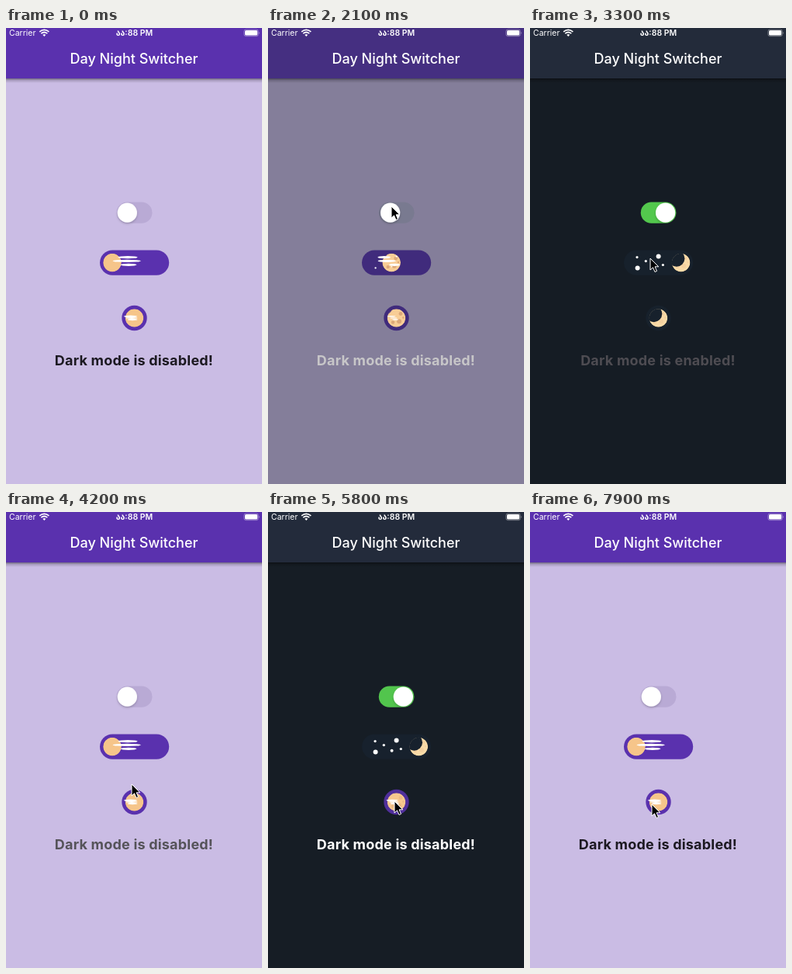
An HTML page for the animation above (8000 ms loop, 330 by 588 pixels).

```html
<!DOCTYPE html>
<html lang="en">
<head>
<meta charset="utf-8">
<title>Day Night Switcher</title>
<style>
  html, body { margin: 0; width: 100%; height: 100%; overflow: hidden; }
  svg { display: block; width: 100vw; height: 100vh; }
  text { font-family: Inter, "DejaVu Sans", sans-serif; }
</style>
</head>
<body>
<svg viewBox="0 0 330 588" preserveAspectRatio="none">
  <defs>
    <linearGradient id="fade" x2="0" y2="1">
      <stop offset="0" stop-opacity=".45"/>
      <stop offset=".4" stop-opacity=".17"/>
      <stop offset="1" stop-opacity="0"/>
    </linearGradient>
    <filter id="soft" x="-30%" y="-30%" width="160%" height="170%">
      <feDropShadow dx="0" dy="1.5" stdDeviation="1.5" flood-opacity=".22"/>
    </filter>
    <clipPath id="disc"><circle r="11.8"/></clipPath>
  </defs>

  <rect id="page" width="330" height="588"/>
  <rect y="65" width="330" height="6" fill="url(#fade)"/>
  <rect id="bar" width="330" height="65"/>

  <g fill="#fff">
    <text x="4" y="10" font-size="10.5">Carrier</text>
    <text x="165.5" y="10" font-size="10.5" font-weight="600" text-anchor="middle">აა:88 PM</text>
    <path d="M47.3 8.8 L49.3 11 L51.3 8.8 Q49.3 7.2 47.3 8.8Z"/>
    <g fill="none" stroke="#fff" stroke-width="1.7">
      <path d="M45.3 7.1 Q49.3 3.9 53.3 7.1"/>
      <path d="M43.2 4.8 Q49.3 -.2 55.4 4.8"/>
    </g>
    <rect x="306.9" y="2" width="18.4" height="8.6" rx="2.4" fill="none" stroke="#fff" stroke-opacity=".45" stroke-width=".8"/>
    <rect x="308" y="3" width="16.2" height="6.6" rx="1.5"/>
    <path d="M326.2 4.9 q1.4 1.4 0 2.8z" opacity=".55"/>
    <text id="title" x="165" y="46" font-size="18" font-weight="500" text-anchor="middle">Day Night Switcher</text>
  </g>

  <rect x="142.8" y="224.6" width="45.6" height="27.2" rx="13.6" fill="#503c78" fill-opacity=".14"/>
  <rect id="green" x="142.8" y="224.6" width="45.6" height="27.2" rx="13.6" fill="#53c84d"/>
  <circle id="knob" cy="238.2" r="12.6" fill="#fff" filter="url(#soft)"/>

  <rect id="pill" x="121" y="286.5" width="89.2" height="32.2" rx="16.1"/>
  <g id="pillOrb"></g>
  <g id="pillStars" fill="#fff"></g>

  <circle id="ring" cx="165.5" cy="374" r="16.2"/>
  <g id="iconOrb"></g>
  <g id="iconStars" fill="#fff"></g>

  <text id="label" x="165" y="435.3" font-size="18" font-weight="700" letter-spacing=".2" text-anchor="middle"></text>
  <path id="cursor" d="M0 0V15L3.5 11.8L6 17.5L8.5 16.4L6.1 10.8H10.8Z" fill="#000" stroke="#fff" stroke-width="1" stroke-linejoin="round"/>
</svg>
<script>
const LOOP = 8000, THEME_MS = 200;
const el = id => document.getElementById(id);
const clamp = x => Math.min(1, Math.max(0, x));
const mix = (a, b, p) => a + (b - a) * p;
const mixColor = (a, b, p) => `rgb(${a.map((v, i) => Math.round(mix(v, b[i], p)))})`;
const set = (node, attrs) => { for (const k in attrs) node.setAttribute(k, attrs[k]); };

// Theme changes; a tapped widget finishes its own animation before the theme starts.
const flips = [
  { at: 1226, dark: 1 },
  { at: 1978, dark: 0 },
  { at: 3080, dark: 1, tapped: 'pill' },
  { at: 3885, dark: 0, tapped: 'pill' },
  { at: 4980, dark: 1, tapped: 'icon' },
  { at: 5800, dark: 0, tapped: 'icon' }
];
const LEAD = 170;

// Darkness from 0 to 1, each flip easing from where the last one stopped.
const darkness = (t, ease, widget) => flips.reduce((p, f) => {
  const start = widget && f.tapped === widget ? f.at - LEAD : f.at;
  return t < start ? p : mix(p, f.dark, clamp(ease(t - start, f.dark)));
}, 0);

const linear = ms => clamp(ms / THEME_MS);
const knobEase = ms => 1 - (1 - clamp(ms / 190)) ** 2.5;
// The label drifts slowly while the theme moves, then catches up.
const labelEase = (ms, dark) => {
  const slow = dark ? .13 : .4;
  return ms < THEME_MS ? slow * ms / THEME_MS : mix(slow, 1, clamp((ms - THEME_MS) / 200));
};

const COLORS = {
  page: [[202, 188, 228], [21, 28, 36]],
  bar: [[90, 49, 174], [35, 43, 58]],
  widget: [[90, 49, 174], [23, 33, 44]],
  orb: [[246, 197, 138], [250, 219, 168]],
  label: [[28, 25, 33], [255, 255, 255]]
};
const tone = (name, p) => mixColor(...COLORS[name], p);

function makeOrb(id) {
  const g = el(id);
  g.innerHTML = `<g clip-path="url(#disc)"><circle r="11.8"/>
    <g fill="#d39c70"><circle cx="3.6" cy="4.2" r="3"/><circle cx="-4.5" cy="5.5" r="2.2"/>
    <circle cx="5.5" cy="-5.5" r="2.4"/><circle cx="8.8" cy="-.5" r="1.2"/></g><circle r="10.6"/></g>`;
  const [disc, craters, shade] = g.firstChild.children;
  return (x, y, p) => {
    set(g, { transform: `translate(${x} ${y})` });
    set(disc, { fill: tone('orb', p) });
    set(craters, { opacity: p < .4 ? p * 2 : mix(.8, .15, clamp((p - .7) / .3)) });
    set(shade, { cx: mix(-22, -5.8, p), cy: mix(-20, -5.4, p), fill: tone('widget', p) });
  };
}

function makeStars(id, specs) {
  const g = el(id);
  g.innerHTML = '<ellipse/>'.repeat(specs.length);
  return p => specs.forEach(([a, b], i) => {
    const [cx, cy, rx, ry] = a.map((v, k) => mix(v, b[k], p));
    set(g.children[i], { cx, cy, rx, ry });
  });
}

const star = (x, y, r) => [[x, y, 0, 0], [x, y, r, r]];
const drawPillOrb = makeOrb('pillOrb');
const drawIconOrb = makeOrb('iconOrb');
const drawStreaks = makeStars('pillStars', [
  [[157, 295.7, 12.5, 1.6], [138, 295.6, 1.6, 1.6]],
  [[155.7, 300.4, 18, 1.6], [149.3, 300.6, 1.6, 1.6]],
  [[158, 305.3, 10.5, 1.6], [171.4, 305.5, 1.6, 1.6]],
  star(165.6, 294.6, 3), star(138.6, 309.4, 3), star(159.6, 307.8, 2)
]);
const drawIconStreaks = makeStars('iconStars', [
  [[160.5, 371.8, 8.8, 1.2], [157, 371.8, 0, 0]],
  [[162, 373.9, 7.5, 1], [162, 374, 0, 0]],
  [[163, 376, 6.5, 1.2], [166, 376, 0, 0]]
]);

const stops = [
  [250, 340, 330], [1000, 159, 229], [2250, 159, 230], [2800, 155, 297],
  [3750, 155, 297], [4200, 162, 351], [4600, 163, 373], [6300, 163, 373],
  [6950, 175, 445], [7450, 170, 420], [7850, 157, 377], [8000, 157, 377]
];
function cursorAt(t) {
  const i = stops.findIndex(s => s[0] > t);
  if (i < 1) return stops[0].slice(1);
  const [a, b] = [stops[i - 1], stops[i]];
  const u = (t - a[0]) / (b[0] - a[0]);
  const e = u * u * (3 - 2 * u);
  return [mix(a[1], b[1], e), mix(a[2], b[2], e)];
}

function draw(t) {
  const theme = darkness(t, linear);
  const pill = darkness(t, linear, 'pill');
  const icon = darkness(t, linear, 'icon');
  const knob = darkness(t, knobEase);
  const last = flips.filter(f => f.at <= t).pop() || { at: 0, dark: 0 };
  const ms = t - last.at;
  const dip = last.dark ? clamp(Math.min(ms / 174, (219 - ms) / 45)) : 0;

  set(el('page'), { fill: tone('page', theme) });
  set(el('bar'), { fill: tone('bar', theme) });
  set(el('title'), { opacity: 1 - .25 * dip });
  set(el('green'), { opacity: knob });
  set(el('knob'), { cx: mix(156.3, 174.6, knob) });

  set(el('pill'), { fill: tone('widget', pill) });
  drawPillOrb(mix(137, 194.6, pill), 302.6, pill);
  drawStreaks(pill);

  set(el('ring'), { fill: tone('widget', icon) });
  drawIconOrb(165.5, 374, icon);
  drawIconStreaks(icon);

  el('label').textContent = `Dark mode is ${last.dark ? 'enabled' : 'disabled'}!`;
  set(el('label'), { fill: tone('label', darkness(t, labelEase)) });
  set(el('cursor'), { transform: `translate(${cursorAt(t)})` });
}

const begin = performance.now();
function tick() {
  draw((performance.now() - begin) % LOOP);
  requestAnimationFrame(tick);
}
tick();
</script>
</body>
</html>
```
